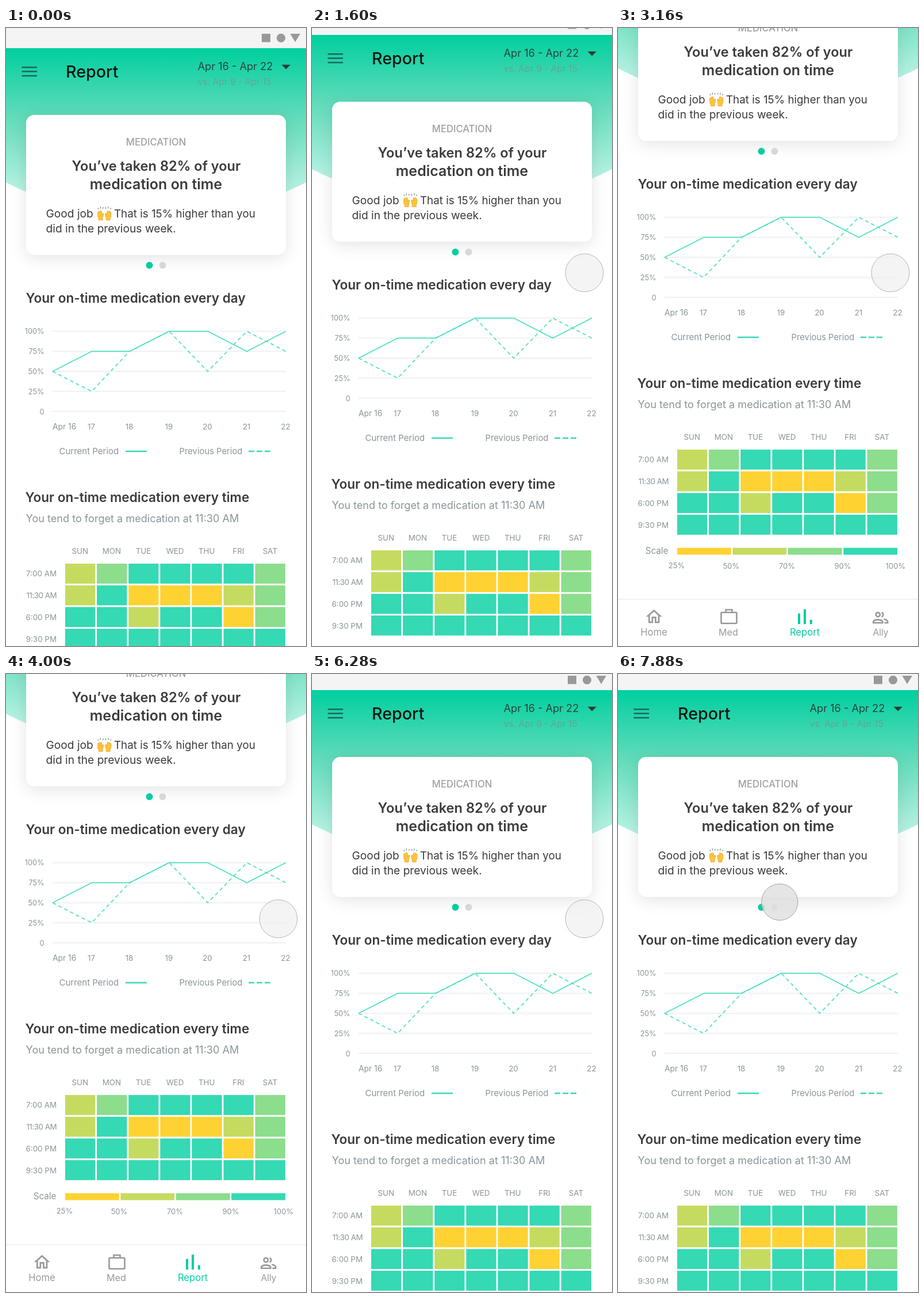
An HTML page that plays this animation: 522x1073 px, repeating every 8000 ms.

```html
<!DOCTYPE html>
<html lang="en">
<head>
<meta charset="utf-8">
<title>Medication report</title>
<style>
  html, body { margin: 0; width: 100%; height: 100%; overflow: hidden; background: #fff; }
  svg { display: block; width: 100%; height: 100%; }
  text { font-family: Inter, "Open Sans", sans-serif; fill: #8a9499; }
  .dark { fill: #3b3b3d; }
  .bold { font-weight: 600; }
  .card { fill: #fff; filter: drop-shadow(0 5px 14px rgba(0, 0, 0, .11)); }
  .line { fill: none; stroke: #4be0be; stroke-width: 1.7; stroke-linejoin: round; }
  .icon { fill: none; stroke: #999; stroke-width: 2.6; }
</style>
</head>
<body>
<svg viewBox="0 0 522 1073">
  <defs>
    <linearGradient id="sky" gradientUnits="userSpaceOnUse" x1="0" y1="35" x2="0" y2="290">
      <stop offset="0" stop-color="#00cf9f"/>
      <stop offset=".45" stop-color="#5edbb9"/>
      <stop offset="1" stop-color="#bdf4e6"/>
    </linearGradient>
    <g id="hand">
      <path d="M-3 24.5V20Q-1.2 17 -1.6 13Q-2.8 11.4 -3.8 13.6L-4.4 15L-5 9.2Q-6.4 7 -7.4 9.4Q-9 7.6 -9.8 10Q-11.8 9.6 -11.7 12L-11.6 17.5Q-11.4 20 -10 21V24.5Z" fill="#fcc43b" stroke="#eda52e" stroke-width=".8"/>
      <path d="M-10.4 5.6L-11.4 3.4M-6.6 4.4L-7 1.2M-2.8 4.8L-2 2" stroke="#8b9297" stroke-width="1.4"/>
    </g>
  </defs>

  <g id="page">
    <rect width="522" height="1273" fill="#fff"/>
    <path d="M0 34H522V268Q261 402 0 268Z" fill="url(#sky)"/>
    <rect width="522" height="35" fill="#f4f4f4"/>
    <g fill="#999">
      <rect x="445" y="10" width="15" height="14.5"/>
      <circle cx="478.5" cy="17.3" r="7.6"/>
      <path d="M494.5 10H512L503.2 24.5Z"/>
    </g>
    <path d="M27.5 68.3H54M27.5 75.6H54M27.5 83H54" stroke="#17685a" stroke-width="2.5"/>
    <path d="M479.5 63.8H495L487.2 71.5Z" fill="#2d3b38"/>

    <rect class="card" x="35" y="151" width="452" height="243" rx="14"/>
    <g transform="translate(171.2 309)">
      <use href="#hand"/>
      <use href="#hand" transform="scale(-1 1)"/>
    </g>
    <circle cx="249.5" cy="411.9" r="6" fill="#00cfa0"/>
    <circle cx="272.5" cy="411.9" r="6" fill="#d8d8d8"/>

    <g id="chart"></g>
    <path d="M208 735H245" stroke="#35d9b4" stroke-width="2.6"/>
    <path d="M422 735H460" stroke="#35d9b4" stroke-width="2.6" stroke-dasharray="10 4"/>
    <g id="heat"></g>

    <rect y="1189" width="522" height="2" fill="#f2f2f2"/>
    <path transform="translate(45.9 1203.4) scale(1.39)" fill="#999" d="M12 5.69l5 4.5V18h-2v-6H9v6H7v-7.81l5-4.5M12 3L2 12h3v8h6v-6h2v6h6v-8h3L12 3z"/>
    <g class="icon">
      <rect x="179.5" y="1212.8" width="27" height="19" rx="1.5"/>
      <path d="M187.5 1212.5V1208H198.5V1212.5"/>
      <circle cx="452.3" cy="1216.5" r="3.6"/>
      <path d="M444.2 1230.8V1228.8Q445.5 1225.4 452.3 1225.4Q459 1225.4 460.4 1228.8V1230.8Z"/>
      <path d="M458.5 1213A3.7 3.7 0 0 1 458.5 1220.2M462.5 1224.2Q469.2 1225.6 469.2 1228.9V1230.8H463.5"/>
    </g>
    <path d="M315 1214.5V1233M325 1207V1233M335.8 1225.5V1233" stroke="#00cfa0" stroke-width="4"/>
    <g id="labels"></g>
  </g>
  <circle id="touch" stroke-width="1"/>
</svg>

<script>
const $ = id => document.getElementById(id);

function add(parent, tag, attrs, text) {
  const el = document.createElementNS("http://www.w3.org/2000/svg", tag);
  for (const k in attrs) el.setAttribute(k, attrs[k]);
  if (text) el.textContent = text;
  $(parent).append(el);
}

function label(text, x, y, size, anchor = "start", extra = {}) {
  add("labels", "text", { x, y, "font-size": size, "text-anchor": anchor, ...extra }, text);
}

// Headings and copy
const bold = { class: "dark bold" }, dark = { class: "dark" };
label("Report", 104, 85.8, 28.7, "start", { style: "fill:#0b1512", "font-weight": 500 });
label("Apr 16 - Apr 22", 333.5, 72.6, 18.2, "start", { style: "fill:#27443d" });
label("vs. Apr 9 - Apr 15", 333.5, 98.8, 15.6, "start", { style: "fill:#6aa295" });
label("MEDICATION", 261, 204.2, 16.6, "middle", { style: "fill:#a0a0a0", "font-weight": 500 });
label("You’ve taken 82% of your", 261.5, 247.5, 23.6, "middle", bold);
label("medication on time", 261, 279.5, 25, "middle", bold);
label("Good job", 69.5, 329.3, 19.2, "start", dark);
label("That is 15% higher than you", 188, 329.3, 18.8, "start", dark);
label("did in the previous week.", 69.5, 355.3, 19.2, "start", dark);
label("Your on-time medication every day", 34.5, 476.8, 22.6, "start", bold);
label("Your on-time medication every time", 33.5, 823.4, 22.6, "start", bold);
label("You tend to forget a medication at 11:30 AM", 34.5, 858.4, 18.1);
label("Current Period", 92.5, 739.5, 15);
label("Previous Period", 301.5, 739.5, 14.8);

// Line chart
const days = [81, 149, 215, 284, 351, 419, 487];
const level = v => 665.8 - v * 1.392;
const points = values => values.map((v, i) => days[i] + "," + level(v)).join(" ");

[100, 75, 50, 25, 0].forEach(v => {
  const y = level(v);
  add("chart", "path", { d: `M81 ${y}H487`, stroke: "#f2f2f2", "stroke-width": 2.4 });
  label(v ? v + "%" : "0", 66.5, y + 4.8, 12.7, "end");
});
add("chart", "polyline", { class: "line", points: points([50, 75, 75, 100, 100, 75, 100]) });
add("chart", "polyline", { class: "line", points: points([50, 25, 75, 100, 50, 100, 75]), "stroke-dasharray": "6.4 5" });
label("Apr 16", 81, 697, 13.8);
days.slice(1).forEach((x, i) => label(String(17 + i), x - .5, 697, 13.4, "middle"));

// Heat map
const tint = { T: "#35d9b4", G: "#8cdd8c", L: "#c5db60", Y: "#ffd233" };
const rows = ["LGTTTTG", "LTYYYLG", "TTLTTYG", "TTTTTTT"];
["SUN", "MON", "TUE", "WED", "THU", "FRI", "SAT"].forEach((d, i) =>
  label(d, 128.8 + i * 55.1, 913.3, 13.4, "middle"));
["7:00 AM", "11:30 AM", "6:00 PM", "9:30 PM"].forEach((time, r) => {
  label(time, 88, 952.4 + r * 37.7, 13.4, "end", r == 1 ? { "letter-spacing": -.5 } : {});
  [...rows[r]].forEach((c, i) => add("heat", "rect", {
    x: 103 + i * 55.1, y: 930 + r * 37.7, width: 52.3, height: 34.7, fill: tint[c]
  }));
});
label("Scale", 87.3, 1111, 15.2, "end");
[..."YLGT"].forEach((c, i) => add("heat", "rect", {
  x: 103 + i * 96.4, y: 1100.5, width: 93.8, height: 12, fill: tint[c]
}));
[25, 50, 70, 90, 100].forEach((v, i) =>
  label(v + "%", [102, 197, 294, 391, 483][i], i ? 1136.8 : 1135.5, 13, "middle"));

// Tab bar
label("Home", 62.5, 1253.4, 16.6, "middle", { style: "fill:#999" });
label("Med", 192, 1253.4, 16.2, "middle", { style: "fill:#999" });
label("Report", 325, 1253.4, 16.6, "middle", { style: "fill:#00cfa0" });
label("Ally", 457, 1253.4, 15.6, "middle", { style: "fill:#999" });

// Motion
const LOOP = 8000, TICK = 40;
const scrollSteps = [
  [0, 0], [1560, 9], [1600, 23], [2280, 96], [2320, 159], [3120, 184],
  [3160, 198], [4000, 199], [6080, 196], [6120, 165], [6200, 60], [6280, 7]
];

const mix = (a, b, p) => a + (b - a) * p;
const bend = (a, c, b, p) => mix(mix(a, c, p), mix(c, b, p), p);
const easeOut = p => 1 - (1 - p) ** 2;
const easeInOut = p => (1 - Math.cos(Math.PI * p)) / 2;

function touchAt(t) {
  if (t >= 360 && t < 400) return [514, 33.5];
  if (t < 760) return null;
  if (t < 1040) {
    const p = easeOut((t - 720) / 320);
    return [mix(552, 474, p), mix(400, 425, p)];
  }
  if (t < 6840) return [474, 425];
  if (t < 7680) {
    const p = easeInOut((t - 6800) / 840);
    return [bend(474, 390, 284, p), bend(425, 457, 398, p)];
  }
  return t < 7720 ? [282.5, 396.7] : [281.3, 396];
}

function draw(now) {
  const t = Math.floor((now % LOOP) / TICK) * TICK;
  const y = scrollSteps.findLast(s => s[0] <= t)[1];
  $("page").setAttribute("transform", `translate(0 ${-y})`);

  const at = touchAt(t), touch = $("touch"), pressed = t >= 7880;
  touch.style.display = at ? "" : "none";
  if (at) {
    touch.setAttribute("cx", at[0]);
    touch.setAttribute("cy", at[1]);
    touch.setAttribute("r", pressed ? 31.6 : 33);
    touch.setAttribute("fill", pressed ? "rgba(224,224,224,.82)" : "rgba(240,240,240,.7)");
    touch.setAttribute("stroke", pressed ? "#a4a4a4" : "#b4b4b4");
  }
}

const start = performance.now();
function frame() {
  draw(performance.now() - start);
  requestAnimationFrame(frame);
}
frame();
</script>
</body>
</html>
```
